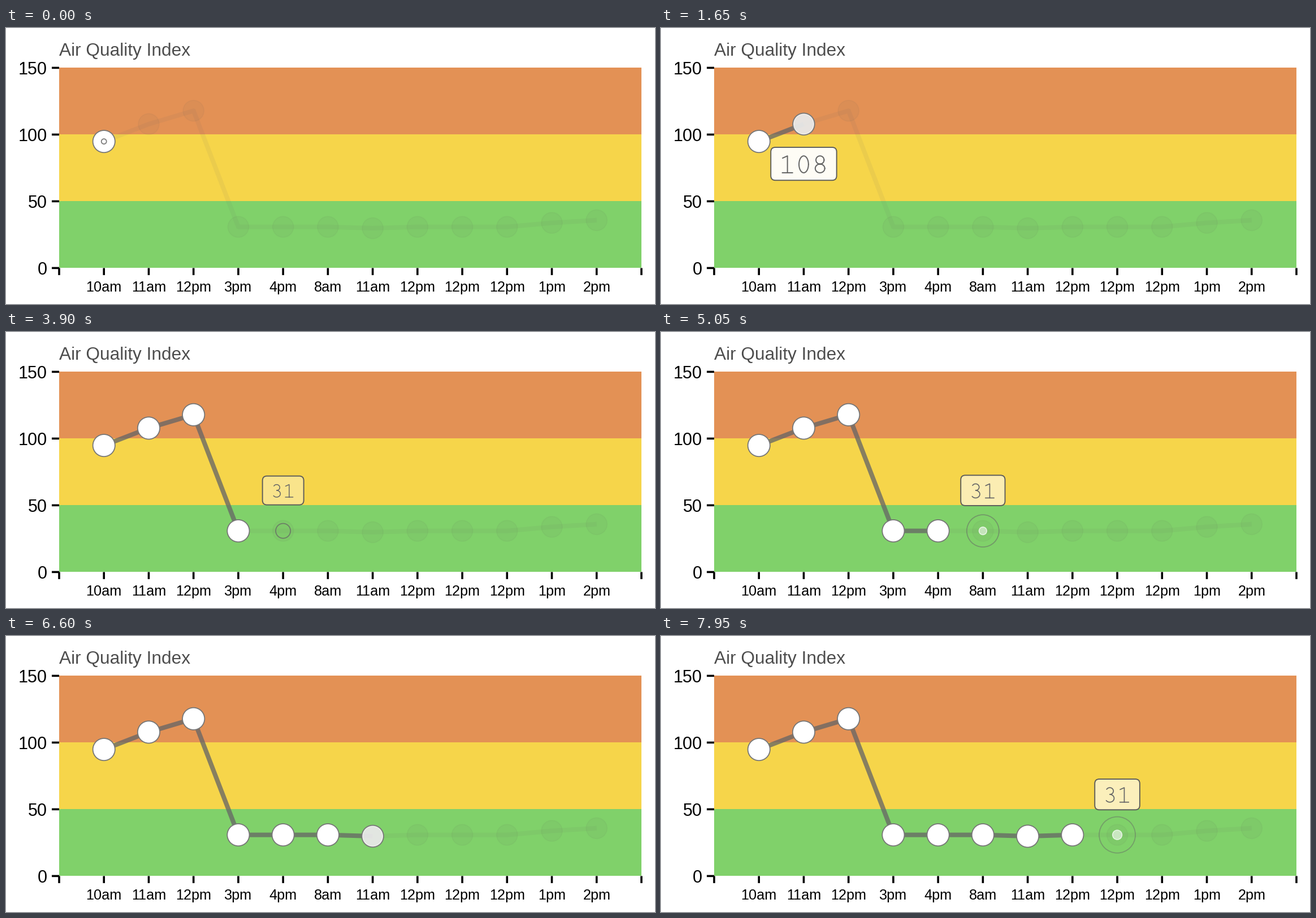
A matplotlib script that plays this animation: 1148 px wide and 488 px high, repeating every 8 s.

```python
import numpy as np
import matplotlib.pyplot as plt
from matplotlib.animation import FuncAnimation
from matplotlib.patches import Circle, FancyBboxPatch, PathPatch, Rectangle
from matplotlib.path import Path

W, H, DPI = 1148, 488, 64
PT = 72 / DPI  # points per pixel
STEP, LOOP = 50, 8000
PERIOD, GROW, FADE = 950, 700, 750
LEFT, RIGHT, TOP, BASE = 94, 1124, 70.4, 424.4

AQI = [95, 108, 118, 31, 31, 31, 30, 31, 31, 31, 34, 36]
HOURS = "10am 11am 12pm 3pm 4pm 8am 11am 12pm 12pm 12pm 1pm 2pm".split()
GREY = (0.4, 0.4, 0.4)
EDGE = "#777777"

plt.rcParams["font.family"] = "Liberation Sans"
fig = plt.figure(figsize=(W / DPI, H / DPI), dpi=DPI, facecolor="white")
ax = fig.add_axes([0, 0, 1, 1])
ax.set_xlim(0, W)
ax.set_ylim(H, 0)
ax.axis("off")

ticks_x = np.linspace(LEFT, RIGHT, len(AQI) + 2)
px = ticks_x[1:-1]
py = BASE + 0.4 - np.array(AQI) * (BASE - TOP) / 150


def arc(cx, cy, rx, ry, start, end):
    a = np.radians(np.linspace(start, end, 40))
    return np.column_stack([cx + rx * np.cos(a), cy + ry * np.sin(a)])


# Thin slab digits as strokes in em units, centred on x, baseline at 0
DIGITS = {
    "0": [arc(0, 0.31, 0.175, 0.31, 0, 360)],
    "1": [np.array([(-0.18, 0.54), (0, 0.62), (0, 0)]),
          np.array([(-0.19, 0), (0.19, 0)])],
    "3": [np.vstack([arc(-0.02, 0.475, 0.155, 0.145, 150, -90),
                     arc(-0.02, 0.165, 0.185, 0.165, 90, -145)])],
    "5": [np.vstack([[(0.15, 0.62), (-0.13, 0.62), (-0.13, 0.34)],
                     arc(0, 0.195, 0.185, 0.195, 130, -145)])],
    "8": [arc(0, 0.47, 0.15, 0.15, 0, 360),
          arc(0, 0.16, 0.175, 0.16, 0, 360)],
    "9": [arc(0, 0.42, 0.175, 0.2, 0, 360),
          arc(-0.16, 0.42, 0.335, 0.42, 0, -90)],
}


def number_path(text, x, y, size):
    parts = []
    for i, ch in enumerate(text):
        dx = x + (i - (len(text) - 1) / 2) * 0.6 * size
        for stroke in DIGITS[ch]:
            parts.append(Path(stroke * [size, -size] + [dx, y + 0.33 * size]))
    return Path.make_compound_path(*parts)


def circle(x, y, r, z, width=1.8, **style):
    return ax.add_patch(Circle((x, y), r, zorder=z, lw=width * PT, **style))


def label(x, y, text, size, ha, color="black"):
    ax.text(x, y, text, fontsize=size * PT, ha=ha, va="baseline", color=color)


def draw_chart():
    band = (BASE - TOP) / 3
    for i, color in enumerate(["#e39155", "#f6d54a", "#80d16a"]):
        ax.add_patch(Rectangle((LEFT, TOP + i * band), RIGHT - LEFT, band,
                               fc=color, lw=0, zorder=0))
    tick = dict(color="black", lw=3.6 * PT, solid_capstyle="butt", zorder=1,
                snap=False)
    for i in range(4):
        y = TOP + i * band
        ax.plot([81, LEFT], [y, y], **tick)
        label(72.5, y + 11.6, str(150 - 50 * i), 30.5, "right")
    for x in ticks_x:
        ax.plot([x, x], [BASE, BASE + 12.5], **tick)
    for x, hour in zip(px, HOURS):
        label(x, 466, hour, 25.3, "center")
    label(93.5, 49, "Air Quality Index", 31.6, "left", "#4d4d4d")
    ax.plot(px, py, color=GREY, alpha=0.075, lw=8 * PT, zorder=2,
            solid_capstyle="butt", solid_joinstyle="round")
    for x, y in zip(px, py):
        circle(x, y, 18.4, 2, fc=GREY, ec=GREY, alpha=0.06)


draw_chart()
trail, = ax.plot([], [], color=GREY, alpha=0.75, lw=8 * PT, zorder=3,
                 solid_capstyle="butt", solid_joinstyle="round")
backing = circle(0, 0, 19.3, 4, fc=(*GREY, 0.75), ec=EDGE)
dots = [circle(x, y, 19.6, 5, fc="white", ec=EDGE) for x, y in zip(px, py)]
bud = circle(0, 0, 0, 6, 1.5)
ring = circle(0, 0, 0, 7, fc="none")
tip = FancyBboxPatch((0, 0), 1, 1, boxstyle="round,pad=0,rounding_size=8",
                     lw=1.9 * PT, ec="#5c5c5a", zorder=8)
ax.add_patch(tip)
digits = PathPatch(Path([(0, 0)]), fc="none", ec="#666666", zorder=9,
                   capstyle="round", joinstyle="round")
ax.add_patch(digits)


def show_tip(k, p):
    size = 32.5 + 15.5 * p
    text = str(AQI[k])
    w, h = len(text) * 0.6 * size + 30, 0.6 * size + 29.5
    x, y = px[k], py[k] + (70.2 if AQI[k] > 100 else -71.5)
    tip.set_bounds(x - w / 2, y - h / 2, w, h)
    tip.set_facecolor((1, 1, 1, 0.2 + 0.75 * p))
    digits.set_path(number_path(text, x, y, size))
    digits.set_linewidth(0.042 * size * PT)


def update(n):
    k, u = divmod(n * STEP + STEP, PERIOD)
    p = min(u / GROW, 1)

    reached = k if u >= GROW else k - 1
    trail.set_data(px[:max(reached, 0) + 1], py[:max(reached, 0) + 1])

    settled = max(k - (u < STEP), 1)
    for i, dot in enumerate(dots):
        dot.set_visible(i < settled)

    # The last point turns solid one step after the next one starts
    cur, q = (k - 1, 1) if u < STEP else (k, p)
    backing.set_center((px[cur], py[cur]))
    backing.set_visible(q == 1)
    bud.set_center((px[cur], py[cur]))
    bud.set_radius(max(0, 17.7 * (q * GROW - 130) / 570))
    bud.set_facecolor((1, 1, 1, 0.3 + 0.51 * q))
    bud.set_edgecolor((1, 1, 1, 0.75))
    bud.set_visible(q * GROW > 150)

    ring.set_center((px[k], py[k]))
    ring.set_radius(0.0915 * u - 2.87e-5 * u * u)
    ring.set_edgecolor((*GREY, 0.9 * (1 - 0.85 * p)))
    ring.set_visible(0 < u < FADE)

    tipped = u >= 2 * STEP
    tip.set_visible(tipped)
    digits.set_visible(tipped)
    if tipped:
        show_tip(k, p)
    return [trail, backing, *dots, bud, ring, tip, digits]


anim = FuncAnimation(fig, update, frames=LOOP // STEP, interval=STEP,
                     repeat=True, repeat_delay=0, blit=False)
plt.show()
```
